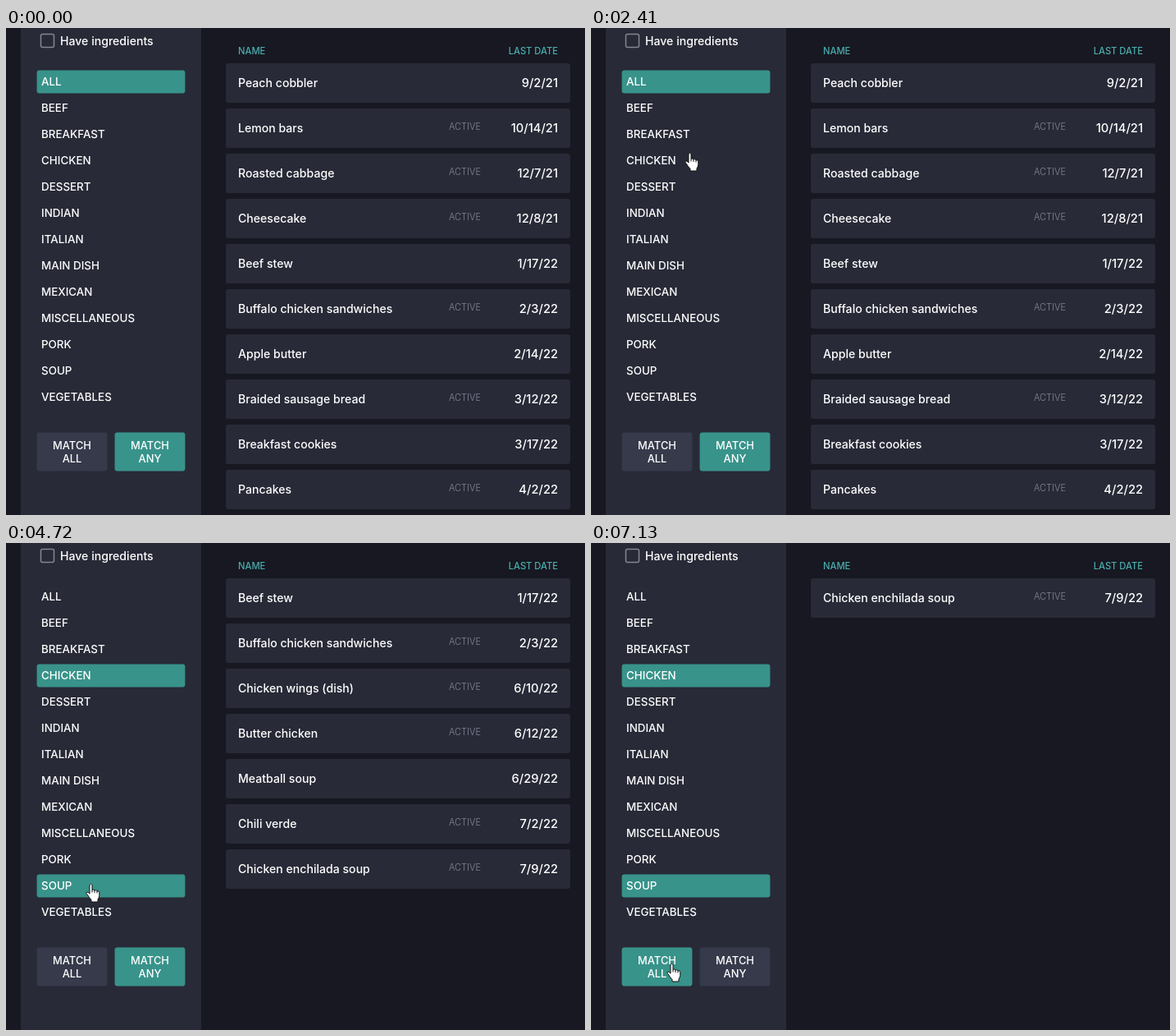
An HTML page with a canvas for the animation above (8000 ms loop, 706 by 593 pixels).

```html
<!DOCTYPE html>
<html lang="en">
<head>
<meta charset="utf-8">
<title>Recipe filter</title>
<style>
html, body { margin: 0; width: 100%; height: 100%; overflow: hidden; background: #171821; }
canvas { display: block; }
</style>
</head>
<body>
<canvas id="stage" width="706" height="593"></canvas>
<script>
const ctx = document.getElementById('stage').getContext('2d');
const LOOP = 8000;
const COLOR = {
  page: '#171821', panel: '#282a37', teal: '#38938a', button: '#363a4b',
  text: '#fff', head: '#4aadae', muted: '#85889a'
};
const FONT = 'Inter, "Open Sans", sans-serif';
const CLICK = { chicken: 2430, soup: 4690, all: 7060 };

const categories = ['ALL', 'BEEF', 'BREAKFAST', 'CHICKEN', 'DESSERT', 'INDIAN', 'ITALIAN',
  'MAIN DISH', 'MEXICAN', 'MISCELLANEOUS', 'PORK', 'SOUP', 'VEGETABLES'];

const recipe = (name, date, active = true) => ({ name, date, active });
const stew = recipe('Beef stew', '1/17/22', false);
const buffalo = recipe('Buffalo chicken sandwiches', '2/3/22');
const wings = recipe('Chicken wings (dish)', '6/10/22');
const butter = recipe('Butter chicken', '6/12/22');
const enchilada = recipe('Chicken enchilada soup', '7/9/22');

const lists = {
  everything: [
    recipe('Peach cobbler', '9/2/21', false),
    recipe('Lemon bars', '10/14/21'),
    recipe('Roasted cabbage', '12/7/21'),
    recipe('Cheesecake', '12/8/21'),
    stew,
    buffalo,
    recipe('Apple butter', '2/14/22', false),
    recipe('Braided sausage bread', '3/12/22'),
    recipe('Breakfast cookies', '3/17/22', false),
    recipe('Pancakes', '4/2/22')
  ],
  chicken: [buffalo, wings, butter, enchilada],
  either: [stew, buffalo, wings, butter, recipe('Meatball soup', '6/29/22', false),
    recipe('Chili verde', '7/2/22'), enchilada],
  both: [enchilada]
};

// Pointer keys: time, left, top. Equal neighbours make a rest.
const path = [
  [490, 642, 586], [800, 357, 350], [960, 239, 224], [1210, 188, 166], [1310, 188, 166],
  [1390, 179, 156], [1600, 149, 150], [1850, 121, 149], [2110, 112, 150], [2340, 112, 150],
  [2410, 114, 151], [3450, 114, 151], [3700, 111, 205], [3900, 97, 300], [4100, 92, 385],
  [4240, 94, 420], [4450, 94, 420], [4600, 97, 414], [6000, 97, 414], [6200, 100, 445],
  [6400, 96, 495], [6570, 92, 511], [8000, 92, 511]
];

const hand = new Path2D('M5 2.5Q6.5 0 8 2.5V8.5Q9.8 7.4 11 9Q13 8 14 9.8Q16.5 9.3 16.8 11.5V15.5' +
  'Q16.5 18 15 20V23H7V20.5Q4.5 18 2.8 15Q1 13 .8 12Q1.5 10.3 3.3 11.5L5 13.2Z');
const knuckles = new Path2D('M8 8.5V11.5M11 9V12M14 10V12.5');
const arrow = new Path2D('M6 1V17.5L9.8 14L12.2 19.6L14.8 18.5L12.4 13H17.5Z');

function slope(i, axis) {
  const a = path[Math.max(i - 1, 0)], b = path[i], c = path[Math.min(i + 1, path.length - 1)];
  const rests = (p, q) => p !== q && p[1] === q[1] && p[2] === q[2];
  return rests(a, b) || rests(b, c) ? 0 : (c[axis] - a[axis]) / (c[0] - a[0]);
}

function pointerAt(t) {
  let i = 0;
  while (i < path.length - 2 && t >= path[i + 1][0]) i++;
  const a = path[i], b = path[i + 1], span = b[0] - a[0], u = (t - a[0]) / span;
  const hermite = axis =>
    (1 + 2 * u) * (1 - u) ** 2 * a[axis] + u * (1 - u) ** 2 * span * slope(i, axis) +
    u * u * (3 - 2 * u) * b[axis] - u * u * (1 - u) * span * slope(i + 1, axis);
  return { x: hermite(1), y: hermite(2) };
}

function box(x, y, w, h, color, radius = 3) {
  ctx.fillStyle = color;
  ctx.beginPath();
  ctx.roundRect(x, y, w, h, radius);
  ctx.fill();
}

function label(text, x, y, size, color = COLOR.text, align = 'left', weight = 500) {
  ctx.font = `${weight} ${size}px ${FONT}`;
  ctx.fillStyle = color;
  ctx.textAlign = align;
  ctx.fillText(text, x, y);
}

function drawSidebar(t) {
  box(18, 0, 220, 593, COLOR.panel, 0);
  ctx.strokeStyle = '#85868f';
  ctx.lineWidth = 1.5;
  ctx.beginPath();
  ctx.roundRect(42.5, 7.5, 16, 16, 2);
  ctx.stroke();
  label('Have ingredients', 66, 21, 14.1);

  const chosen = {
    ALL: t < CLICK.chicken, CHICKEN: t >= CLICK.chicken, SOUP: t >= CLICK.soup
  };
  categories.forEach((name, i) => {
    const y = 52 + i * 32;
    if (chosen[name]) box(37.6, y - 0.4, 180.8, 27.8, COLOR.teal);
    label(name, 43, y + 18, 13.4);
  });

  const matchAll = t < CLICK.all ? 0 : t < CLICK.all + 70 ? 0.5 : 1;
  drawButton(38, 'ALL', matchAll);
  drawButton(133, 'ANY', 1 - matchAll);
}

function drawButton(x, word, amount) {
  const fill = color => box(x - 0.4, 492.6, 85.8, 46.8, color);
  fill(COLOR.button);
  ctx.globalAlpha = amount;
  fill(COLOR.teal);
  ctx.globalAlpha = 1;
  label('MATCH', x + 42.5, 513, 12.9, COLOR.text, 'center');
  label(word, x + 42.5, 529, 12.9, COLOR.text, 'center');
}

function currentList(t) {
  if (t < CLICK.chicken) return lists.everything;
  if (t < CLICK.soup) return lists.chicken;
  return t < CLICK.all ? lists.either : lists.both;
}

function drawList(rows) {
  label('NAME', 283, 32, 11.2, COLOR.head);
  label('LAST DATE', 673, 32, 11.2, COLOR.head, 'right');
  rows.forEach(({ name, date, active }, i) => {
    const y = 43 + i * 55;
    box(268, y, 420, 48, COLOR.panel);
    label(name, 283, y + 29, 14.1);
    if (active) label('ACTIVE', 540, y + 26, 11, COLOR.muted, 'left', 300);
    label(date, 673, y + 29, 14.7, COLOR.text, 'right');
  });
}

function isClickable(x, y, count) {
  if (x >= 268 && x <= 688) return y >= 43 && y < 43 + count * 55 && (y - 43) % 55 < 48;
  return x >= 38 && x <= 218 && y >= 52;
}

function drawPointer(t, count) {
  if (t < path[0][0]) return;
  const { x, y } = pointerAt(t);
  const overTarget = isClickable(x + 6, y + 1, count);
  const shape = overTarget ? hand : arrow;
  ctx.save();
  ctx.translate(x, y);
  ctx.lineJoin = 'round';
  ctx.lineWidth = 1;
  ctx.fillStyle = '#fff';
  ctx.strokeStyle = '#111';
  ctx.fill(shape);
  ctx.stroke(shape);
  if (overTarget) ctx.stroke(knuckles);
  ctx.restore();
}

function frame() {
  const t = performance.now() % LOOP;
  const rows = currentList(t);
  box(0, 0, 706, 593, COLOR.page, 0);
  drawSidebar(t);
  drawList(rows);
  drawPointer(t, rows.length);
  requestAnimationFrame(frame);
}
frame();
</script>
</body>
</html>
```
